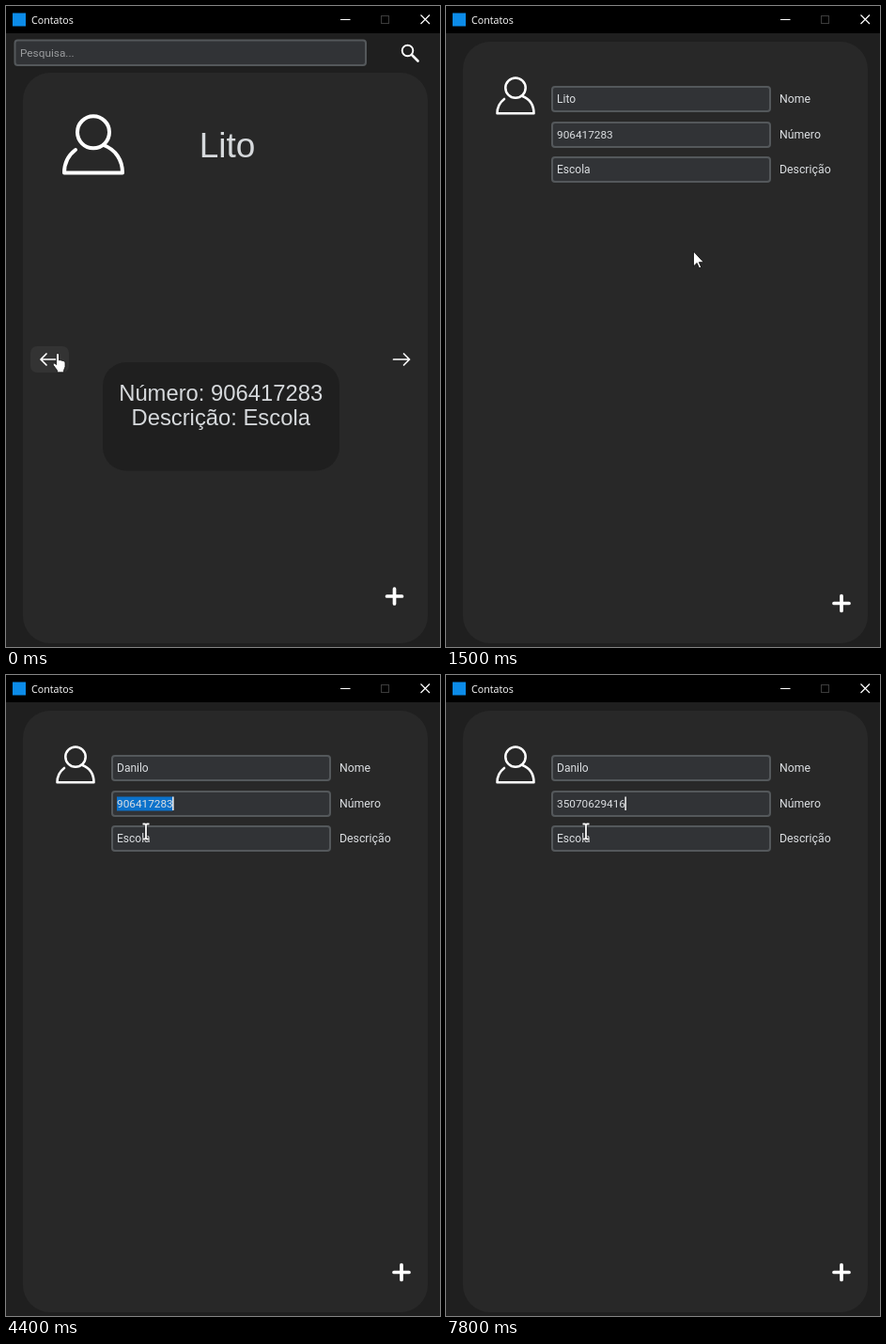
These frames come from a looping animation (462 by 682 pixels, 8000 ms). An HTML page:

```html
<!DOCTYPE html>
<html lang="pt">
<head>
<meta charset="utf-8">
<title>Contatos</title>
<style>
  html, body { margin: 0; width: 100%; height: 100%; overflow: hidden; background: #1f1f1f; }
  svg { display: block; width: 100vw; height: 100vh; }
  text { white-space: pre; }
  .ui { font: 12px Roboto, sans-serif; fill: #dcdfe2; }
  .label { font-size: 12.3px; }
  .hint { font-size: 11.8px; fill: #9a9c9e; }
  .bar { font: 10.7px "Open Sans", sans-serif; fill: #fff; }
  .card { font: 23.8px "Liberation Sans", Arial, sans-serif; fill: #d6d9dc; text-anchor: middle; }
  .panel { fill: #282828; }
  .hover { fill: #333; }
  .entry { fill: #313336; stroke: #54585b; stroke-width: 2; }
  .line { fill: none; stroke: #fff; stroke-linecap: round; stroke-linejoin: round; }
</style>
</head>
<body>
<svg viewBox="0 0 462 682">
  <defs>
    <g id="person" class="line" stroke-width="4">
      <circle cx="93" cy="134.300" r="17"/>
      <path d="M104 148C117 153 124 164 124 177.500H62C62 167 66 159 74 153"/>
    </g>
    <path id="plus" class="line" stroke-width="3.700" d="M-8 0H8M0-8V8"/>
    <path id="arrow" class="line" stroke-width="1.700" d="M-8.500 0H8.500M2.500-6L8.500 0L2.500 6"/>
    <path id="beamShape" d="M-3.500-8H-1L0-7L1-8H3.500M0-7V7M-3.500 8H-1L0 7L1 8H3.500"/>
  </defs>

  <rect width="462" height="682" fill="#1f1f1f"/>
  <rect width="462" height="29"/>
  <rect x="7" y="7.500" width="14" height="14" fill="#0c8ce9"/>
  <text class="bar" x="27" y="18.500">Contatos</text>
  <path d="M356 14.500H366.500M441.500 9.500L451 19M451 9.500L441.500 19" stroke="#fff" stroke-width="1.200"/>
  <rect x="399.500" y="10.500" width="8" height="8" fill="none" stroke="#3c3c3c"/>

  <g id="view">
    <rect class="entry" x="9.500" y="36.500" width="373.500" height="26.500" rx="3"/>
    <text class="ui hint" x="15" y="54">Pesquisa...</text>
    <g class="line" stroke-width="1.900">
      <circle cx="427.500" cy="47.500" r="5.800"/>
      <path stroke-width="2.600" d="M432.500 52.500L438.500 58.500"/>
    </g>
    <rect class="panel" x="18" y="71" width="431" height="607" rx="29"/>
    <use href="#person"/>
    <text class="card" id="title" x="235.500" y="161" style="font-size:37px"></text>
    <rect id="backHover" class="hover" x="26" y="362" width="41" height="28" rx="7"/>
    <use href="#arrow" transform="translate(45.500 376) scale(-1 1)"/>
    <use href="#arrow" transform="translate(421 376)"/>
    <rect x="103" y="379" width="252" height="115.500" rx="25" fill="#1f1f1f"/>
    <text class="card" id="phone" x="228.700" y="419.500"></text>
    <text class="card" x="228.700" y="445.700">Descrição: Escola</text>
    <rect id="editHover" class="hover" x="385" y="612" width="56" height="32" rx="16"/>
    <use href="#plus" transform="translate(413.500 628)"/>
  </g>

  <g id="form">
    <rect class="panel" x="18" y="38" width="431" height="640" rx="29"/>
    <use href="#person" transform="translate(15.400 2.500) scale(.63)"/>
    <g id="fields"></g>
    <rect id="saveHover" class="hover" x="393" y="620" width="56" height="32" rx="16"/>
    <use href="#plus" transform="translate(421 635.500)"/>
  </g>

  <g id="cursor">
    <path id="hand" fill="#fff" stroke="#111" stroke-width=".8" d="M-1.500 1a1.500 1.500 0 0 1 3 0v6l1-.3 1.600.4 1 .3 1.400.4q1.500.3 1.500 2v4l-1.500 4v2h-7v-2l-4-5.500q-1-1.600.3-2.200 1.200-.4 2.700 1.600z"/>
    <path id="pointer" fill="#fff" stroke="#111" stroke-width=".9" d="M0 0v16l3.700-3.500 2.400 5.500 2.200-1-2.400-5.300h5z"/>
    <g id="beam" fill="none">
      <use href="#beamShape" stroke="#111" stroke-width="2.800"/>
      <use href="#beamShape" stroke="#fff" stroke-width="1.800"/>
    </g>
  </g>
</svg>
<script>
const LOOP = 8000, OPEN = 1000, PRESS = 1780, TAB = 3900, LEFT = 118;
const TOPS = [85, 123, 160];
const OLD = { name: 'Lito', phone: '906417283' };
const NEW = { name: 'Danilo', phone: '35070629416' };
const NAME_KEYS = [2600, 2800, 3100, 3200, 3500, 3700];
const PHONE_KEYS = [5600, 5800, 6000, 6300, 6600, 6800, 7000, 7200, 7350, 7500, 7700];

// pointer path: time, x, y
const PATH = [
  [0, 55, 370], [100, 55, 370], [880, 408, 621], [1080, 408, 621],
  [1750, 198, 98], [1960, 116, 98], [2080, 116, 98], [2680, 149, 166.5], [LOOP, 149, 166.5]
];

const $ = id => document.getElementById(id);
const show = (el, on) => el.style.display = on ? '' : 'none';
const clamp = (v, lo, hi) => Math.min(hi, Math.max(lo, v));
const inside = ([x, y], l, t, w, h) => x >= l && x <= l + w && y >= t && y <= t + h;

function make(tag, attrs, text = '') {
  const el = document.createElementNS('http://www.w3.org/2000/svg', tag);
  for (const key in attrs) el.setAttribute(key, attrs[key]);
  el.textContent = text;
  $('fields').append(el);
  return el;
}

function makeField(top, label, size) {
  make('rect', { class: 'entry', x: 113, y: top + 1, width: 232, height: 26, rx: 3 });
  make('text', { class: 'ui label', x: 355, y: top + 17.5 }, label);
  return {
    mark: make('rect', { y: top + 6.5, height: 15, fill: '#0b72cb' }),
    text: make('text', { class: 'ui', x: LEFT, y: top + 18, style: `font-size:${size}px` }),
    caret: make('rect', { y: top + 6.5, height: 14.5, width: 1.4, fill: '#fff' })
  };
}

const name = makeField(TOPS[0], 'Nome', 12);
const phone = makeField(TOPS[1], 'Número', 11.8);
const about = makeField(TOPS[2], 'Descrição', 12);
$('title').textContent = OLD.name;
$('phone').textContent = 'Número: ' + OLD.phone;

function setField(field, value, caret = false, selectFrom = null, caretAtStart = false) {
  field.text.textContent = value;
  const end = LEFT + field.text.getComputedTextLength();
  const from = selectFrom === null ? end : clamp(selectFrom, LEFT - 0.5, end);
  field.mark.setAttribute('x', from);
  field.mark.setAttribute('width', end - from);
  field.caret.setAttribute('x', (caretAtStart ? from : end) - 0.5);
  show(field.caret, caret);
}

function pointerAt(t) {
  const i = PATH.findIndex((p, k) => k && t <= p[0]);
  const [t0, x0, y0] = PATH[i - 1], [t1, x1, y1] = PATH[i];
  const u = (t - t0) / (t1 - t0), e = u * u * (3 - 2 * u);
  return [x0 + (x1 - x0) * e, y0 + (y1 - y0) * e];
}

const typed = (value, keys, t) => value.slice(0, keys.filter(k => t >= k).length);

// 600 ms on, 300 ms off
const blink = since => since % 900 < 600;

function drawForm(t, pos) {
  if (t < NAME_KEYS[0]) {
    const selecting = t >= PRESS;
    setField(name, OLD.name, selecting, selecting ? (t > 1960 ? LEFT - 0.5 : pos[0]) : null, true);
  } else {
    setField(name, typed(NEW.name, NAME_KEYS, t), t < TAB);
  }
  if (t < PHONE_KEYS[0]) {
    setField(phone, OLD.phone, t >= TAB && blink(t - TAB), t >= TAB ? LEFT : null);
  } else {
    setField(phone, typed(NEW.phone, PHONE_KEYS, t), true);
  }
  setField(about, 'Escola');
}

function draw(t) {
  const pos = pointerAt(t), form = t >= OPEN;
  show($('view'), !form);
  show($('form'), form);
  if (form) drawForm(t, pos);

  const back = !form && inside(pos, 26, 362, 41, 28);
  const edit = !form && inside(pos, 385, 612, 56, 32);
  const save = form && inside(pos, 393, 620, 56, 32);
  show($('backHover'), back);
  show($('editHover'), edit);
  show($('saveHover'), save);

  const hand = back || edit || save;
  const beam = form && TOPS.some(top => inside(pos, 112, top, 234, 28));
  show($('hand'), hand);
  show($('beam'), beam);
  show($('pointer'), !hand && !beam);
  // the pointer merges with the caret at the end of the drag
  show($('cursor'), t < 1940 || t > 2100);
  $('cursor').setAttribute('transform', `translate(${pos[0]} ${pos[1]})`);
}

function tick() {
  draw(performance.now() % LOOP);
  requestAnimationFrame(tick);
}
tick();
</script>
</body>
</html>
```
